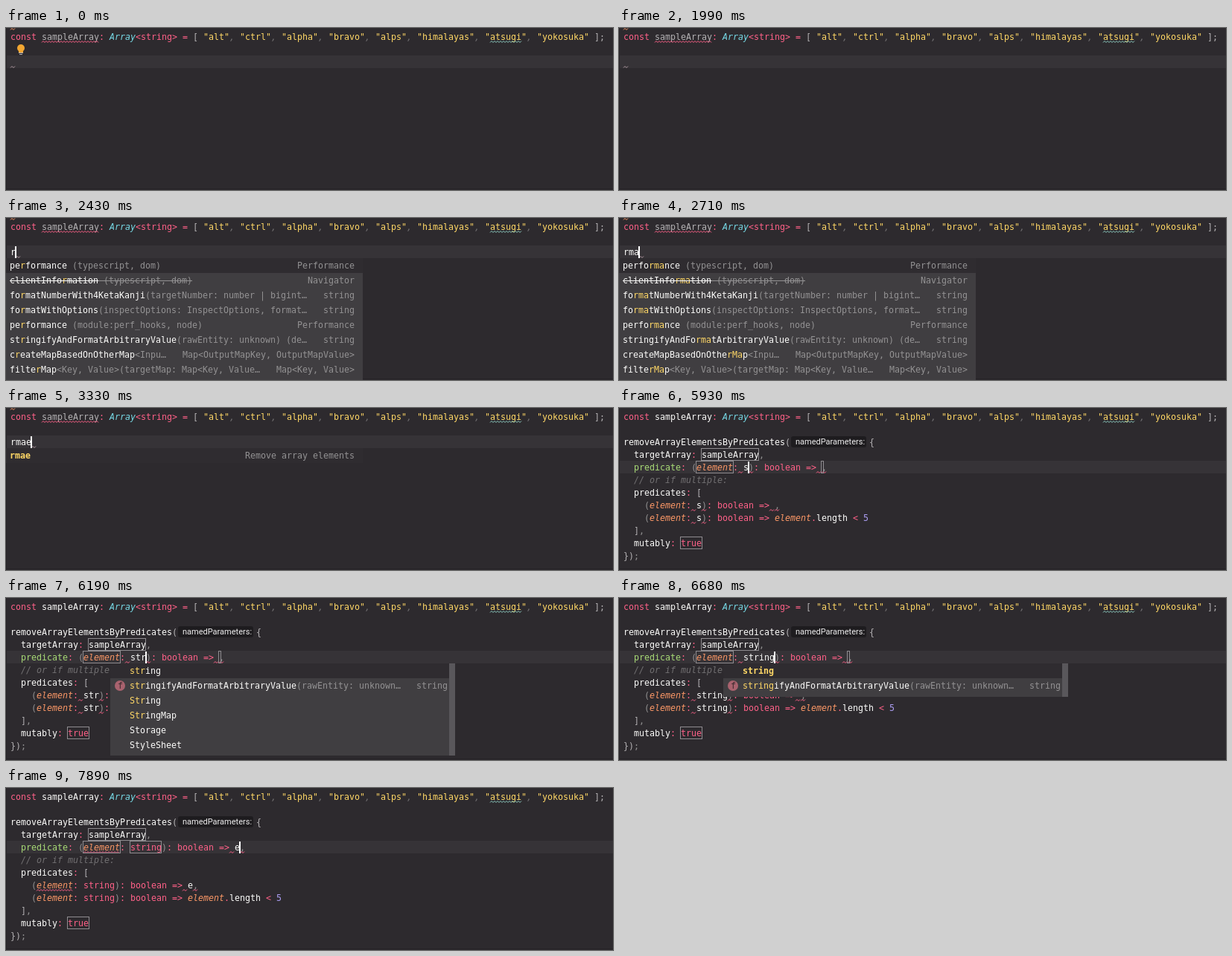
An HTML page with a canvas that plays this animation: 815x218 px, repeating every 8000 ms.

```html
<!DOCTYPE html>
<html lang="en">
<head>
<meta charset="utf-8">
<title>Live template in a code editor</title>
<style>
  html, body { margin: 0; height: 100%; overflow: hidden; background: #2d2a2e; }
  canvas { display: block; }
</style>
</head>
<body>
<canvas id="stage" width="815" height="218"></canvas>
<script>
const ctx = document.getElementById('stage').getContext('2d');
const LOOP = 8000, CHAR = 7, LINE = 17, LEFT = 6, ITEM = 20;
const MONO = '11.63px "DejaVu Sans Mono", monospace';
// Token colours: pink, yellow, cyan, orange, green, violet, white, grey, dim, comment
const COLOR = {
  p: '#ff6188', y: '#ffd866', c: '#78dce8', o: '#fc9867', g: '#a9dc76',
  v: '#ab9df2', w: '#fcfcfa', a: '#b5b3b5', d: '#939293', m: '#727072'
};
const ITALIC = 'com';
const STRINGS = ['alt', 'ctrl', 'alpha', 'bravo', 'alps', 'himalayas', 'atsugi', 'yokosuka'];

const GLOBAL_ITEMS = [
  ['performance', ' (typescript, dom)', 'Performance'],
  ['clientInformation', ' (typescript, dom)', 'Navigator', true],
  ['formatNumberWith4KetaKanji', '(targetNumber: number | bigint…', 'string'],
  ['formatWithOptions', '(inspectOptions: InspectOptions, format…', 'string'],
  ['performance', ' (module:perf_hooks, node)', 'Performance'],
  ['stringifyAndFormatArbitraryValue', '(rawEntity: unknown) (de…', 'string'],
  ['createMapBasedOnOtherMap', '<Inpu…', 'Map<OutputMapKey, OutputMapValue>'],
  ['filterMap', '<Key, Value>(targetMap: Map<Key, Value…', 'Map<Key, Value>']
];
const TEMPLATE_ITEMS = [['rmae', '', 'Remove array elements']];
const TYPE_ITEMS = [
  ['string', '', ''],
  ['stringifyAndFormatArbitraryValue', '(rawEntity: unknown…', 'string']
];
const MORE_TYPE_ITEMS = [['String', '', ''], ['StringMap', '', ''], ['Storage', '', ''], ['StyleSheet', '', '']];

const column = (col) => LEFT + col * CHAR;
const typedCount = (times, t) => times.filter((time) => time <= t).length;

function fill(color, x, y, w, h) {
  ctx.fillStyle = color;
  ctx.fillRect(x, y, w, h);
}

function print(text, x, baseline, color, style = '') {
  ctx.font = `${style} ${MONO}`;
  ctx.fillStyle = color;
  ctx.fillText(text, x, baseline);
  return x + text.length * CHAR;
}

// Tokens come as [colour key, text] pairs; returns the end position.
function write(row, x, ...tokens) {
  for (const [key, text] of tokens) {
    x = print(text, x, 16 + row * LINE, COLOR[key], ITALIC.includes(key) ? 'italic' : '');
  }
  return x;
}

function squiggle(row, x, width, color = COLOR.p) {
  const y = row * LINE + 18;
  ctx.beginPath();
  for (let dx = 0; dx <= width; dx += 2) ctx.lineTo(x + dx, y + (dx % 4 ? -0.5 : 1.5));
  ctx.strokeStyle = color;
  ctx.lineWidth = 1;
  ctx.stroke();
}

function box(row, x, width) {
  ctx.strokeStyle = '#8f8c90';
  ctx.lineWidth = 1;
  ctx.strokeRect(x - 0.5, row * LINE + 3.5, width, 16);
}

const select = (row, x, width) => fill('#5b5748', x, row * LINE + 4, width, 15);
const caret = (row, x) => fill('#ffffff', x - 1, row * LINE + 4, 2, 16);
const highlightRow = (row) => fill('#363337', 1, row * LINE + 3, 814, LINE);

function popup(items, prefix, { x, y, width, height, textX, right }) {
  fill('#403e41', x, y, width, height);
  fill('#2f2c30', x, y, width, ITEM);
  items.forEach(([name, detail, type, deprecated], i) => {
    const baseline = y + i * ITEM + 14;
    const start = name.toLowerCase().indexOf(prefix);
    const match = start < 0 ? '' : name.substr(start, prefix.length);
    const head = name.slice(0, Math.max(start, 0));
    const matchX = print(head, textX, baseline, COLOR.w);
    const restX = print(match, matchX, baseline, COLOR.y, match === name ? 'bold' : '');
    const detailX = print(name.slice(head.length + match.length), restX, baseline, COLOR.w);
    const end = print(detail, detailX, baseline, COLOR.d);
    print(type, right - type.length * CHAR, baseline, COLOR.d);
    if (deprecated) {
      fill(COLOR.w, textX, baseline - 4, detailX - textX, 1);
      fill(COLOR.d, detailX, baseline - 4, end - detailX, 1);
    }
  });
}

function drawDeclaration(t) {
  const unused = t < 4350;
  const strings = STRINGS.flatMap((s, i) => [['y', `"${s}"`], ['m', i < STRINGS.length - 1 ? ', ' : ' ']]);
  write(0, LEFT, ['p', 'const '], [unused ? 'a' : 'w', 'sampleArray'], ['p', ': '], ['c', 'Array'],
    ['p', '<string> = '], ['a', '[ '], ...strings, ['a', '];']);
  squiggle(0, column(92), 42, '#8fd0c4');
  if (t < 4680) {
    squiggle(0, column(6), 77);
    squiggle(-1, LEFT, 6, COLOR.o);
  }
  if (t >= 3980 && t < 5010) box(0, column(6), 77);
}

function drawTyping(t) {
  const typed = 'rmae'.slice(0, typedCount([2090, 2500, 2710, 3260], t));
  const end = write(2, LEFT, ['w', typed]);
  squiggle(2, t < 2200 ? LEFT : end, 6, '#b09aa2');
  if (t < 1000) drawBulb();
  if (t >= 1000 && t < 1990 || t >= 2090) caret(2, end);
  if (t >= 2360) {
    const items = t < 3330 ? GLOBAL_ITEMS : TEMPLATE_ITEMS;
    popup(items, typed, { x: 0, y: 54, width: 479, height: t < 3330 ? 164 : ITEM, textX: 5, right: 468 });
  }
}

function drawBulb() {
  ctx.fillStyle = '#f2a732';
  ctx.beginPath();
  ctx.arc(20, 27, 5, 0, Math.PI * 2);
  ctx.fill();
  ctx.fillRect(17, 29, 6, 4);
  fill('#b5b3b5', 17, 33, 6, 1);
  fill('#b5b3b5', 18, 35, 4, 1);
}

function drawInlay() {
  ctx.fillStyle = '#1e1c1f';
  ctx.beginPath();
  ctx.roundRect(231, 38, 101, 15, 3);
  ctx.fill();
  ctx.font = '11px Roboto, sans-serif';
  ctx.fillStyle = '#f0eff0';
  ctx.fillText('namedParameters:', 237, 49);
}

function drawTemplate(t) {
  const analysed = t >= 4350;
  const array = t >= 3860 ? 'sampleArray' : '';
  const type = 'string'.slice(0, typedCount([5930, 6050, 6190, 6330, 6470, 6610], t));
  const body = t >= 7890 ? 'e' : '';
  const name = analysed ? 'o' : 'w';
  const slot = t < 5010 ? 0 : t < 5510 ? 1 : t < 7410 ? 2 : 3;
  const arrayX = column(15), nameX = column(14), typeX = column(23);
  const typeEnd = typeX + type.length * CHAR;
  const bodyX = typeEnd + 14 * CHAR;

  write(2, LEFT, ['w', 'removeArrayElementsByPredicates'], ['a', '(']);
  if (analysed) drawInlay();
  write(2, analysed ? 336 : 230, ['a', '{']);

  if (slot === 0 && t >= 4280) select(3, arrayX, 77);
  if (slot === 1) select(4, nameX, 49);
  write(3, column(2), ['w', 'targetArray'], ['p', ': '],
    [slot === 0 && t >= 4280 ? 'y' : 'w', array], ['d', ',']);

  const lambda = [['d', '('], [name, 'element'], ['p', ': '], [t >= 7090 ? 'p' : 'w', type],
    ['d', ')'], ['p', ': boolean => ']];
  write(4, column(2), [analysed ? 'g' : 'w', 'predicate'], ['p', ': '], ...lambda, ['w', body], ['d', ',']);
  write(5, column(2), ['m', '// or if multiple:']);
  write(6, column(2), ['w', 'predicates'], ['p', ': '], ['a', '[']);
  write(7, column(4), ...lambda, ['w', body], ['d', ',']);
  write(8, column(4), ...lambda, [name, 'element'], ['p', '.'], ['w', 'length'], ['p', ' < '], ['v', '5']);
  write(9, column(2), ['a', ']'], ['d', ',']);
  write(10, column(2), ['w', 'mutably'], ['p', ': true']);
  write(11, LEFT, ['a', '})'], ['d', ';']);

  if (analysed) drawErrors(t, typeEnd, bodyX, body);

  box(3, arrayX, array.length * CHAR || 3);
  box(4, nameX, 50);
  if (slot !== 2) box(4, typeX, type.length * CHAR || 3);
  if (slot !== 3) box(4, bodyX, 3);
  box(10, column(11), 29);

  const carets = [[3, arrayX + array.length * CHAR], [4, nameX + 49], [4, typeEnd], [4, bodyX + body.length * CHAR]];
  caret(...carets[slot]);
  if (t >= 6050 && t < 6750) drawTypePopup(t, type);
}

function drawErrors(t, typeEnd, bodyX, body) {
  const shift = 9 * CHAR;
  const resolved = t >= 7090;
  for (const [row, dx] of [[4, 0], [7, shift], [8, shift]]) {
    if (!resolved) {
      squiggle(row, column(22) - dx, 6);
      squiggle(row, typeEnd - dx, 6);
    } else if (row !== 8) {
      squiggle(row, column(14) - dx, 48);
    }
    if (row !== 8) {
      squiggle(row, bodyX - CHAR - dx, 6);
      squiggle(row, bodyX + body.length * CHAR - dx, 6);
    }
  }
}

function drawTypePopup(t, prefix) {
  const tall = t < 6400;
  const items = tall ? [...TYPE_ITEMS, ...MORE_TYPE_ITEMS] : TYPE_ITEMS;
  const height = tall ? 124 : 45;
  popup(items, prefix, { x: 140, y: 88, width: 463, height, textX: 166, right: 593 });
  fill('#59575b', 595, 88, 8, height);
  ctx.fillStyle = '#a9626e';
  ctx.beginPath();
  ctx.arc(153, 118, 7, 0, Math.PI * 2);
  ctx.fill();
  print('f', 150, 122, '#3a2a2e');
}

function draw(t) {
  fill('#2d2a2e', 0, 0, 815, 218);
  highlightRow(t < 3790 ? 2 : t < 5010 ? 3 : 4);
  fill('#252226', 0, 0, 1, 218);
  fill('#252226', 0, 216, 815, 1);
  drawDeclaration(t);
  if (t < 3790) drawTyping(t);
  else drawTemplate(t);
}

const start = performance.now();
function tick() {
  draw((performance.now() - start) % LOOP);
  requestAnimationFrame(tick);
}
tick();
</script>
</body>
</html>
```
